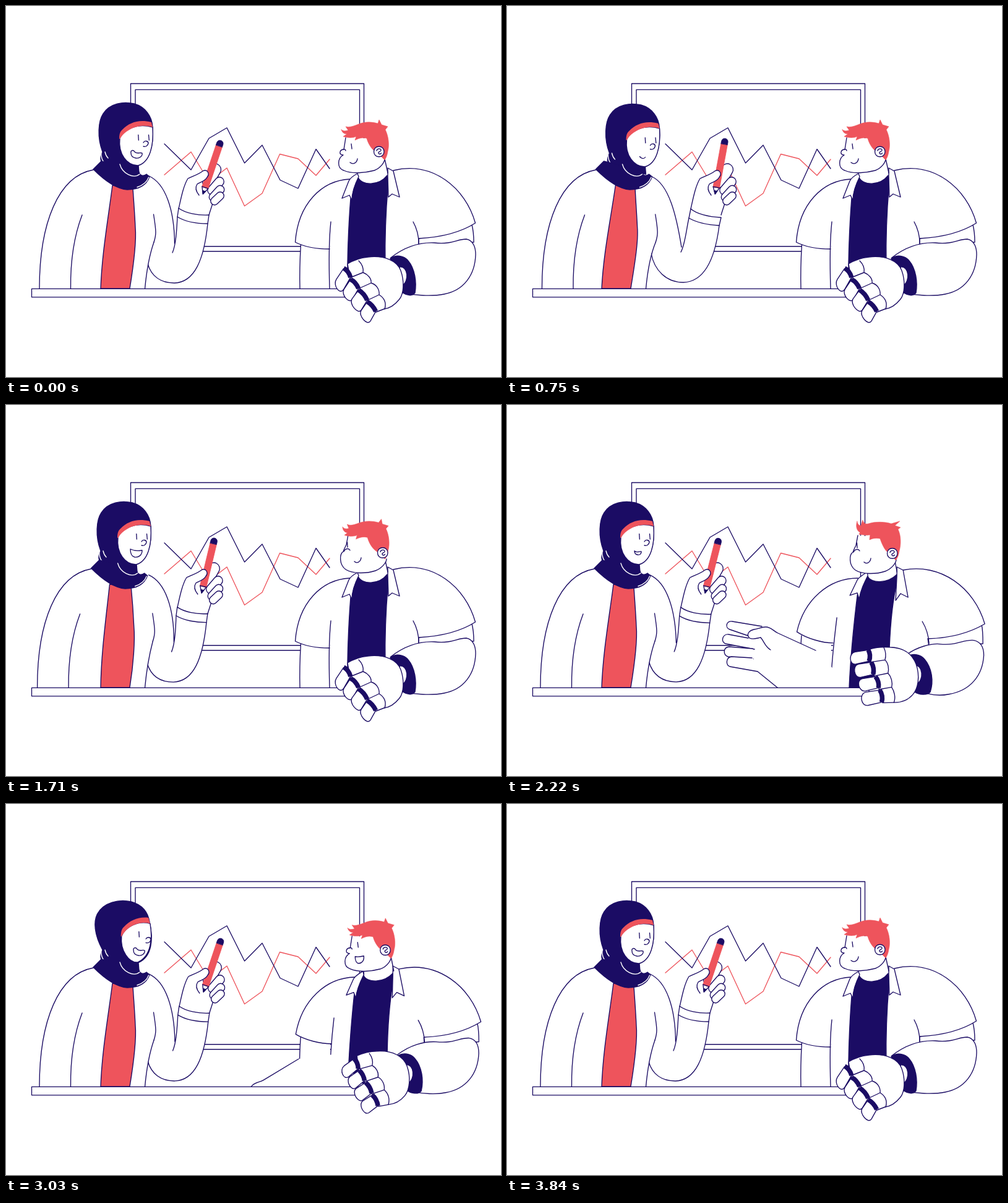
Animation of 800x600 px, one loop 3.87 s. Source, as an HTML page with a canvas:

```html
<!DOCTYPE html>
<html lang="en">
<head>
<meta charset="utf-8">
<title>Whiteboard talk</title>
<style>
html, body { margin: 0; width: 100%; height: 100%; overflow: hidden; background: #fff; }
canvas { display: block; width: 800px; height: 600px; }
</style>
</head>
<body>
<canvas id="stage" width="800" height="600"></canvas>
<script>
const LOOP = 3870;
const NAVY = '#1b0c64', RED = '#ee545c', WHITE = '#fff';
const c = document.getElementById('stage').getContext('2d');

// Blend the numbers of two paths of equal structure.
function mix(a, b, k) {
  const to = b.match(/-?[\d.]+/g);
  let i = 0;
  return a.replace(/-?[\d.]+/g, n => (+n + (to[i++] - n) * k).toFixed(2));
}

// Eased value from a flat list of time, value pairs.
function track(keys, t) {
  if (t <= keys[0]) return keys[1];
  for (let i = 2; i < keys.length; i += 2) {
    if (t < keys[i]) {
      const p = (t - keys[i - 2]) / (keys[i] - keys[i - 2]);
      return keys[i - 1] + (keys[i + 1] - keys[i - 1]) * p * p * (3 - 2 * p);
    }
  }
  return keys[keys.length - 1];
}

// Last value whose start time has passed.
function held(steps, t) {
  let v = steps[1];
  for (let i = 0; i < steps.length; i += 2) if (t >= steps[i]) v = steps[i + 1];
  return v;
}

function draw(d, fill, stroke = NAVY, width = 1.35) {
  const p = new Path2D(d);
  if (fill) { c.fillStyle = fill; c.fill(p); }
  if (stroke) { c.strokeStyle = stroke; c.lineWidth = width; c.stroke(p); }
}

function moved(x, y, fn) {
  c.save();
  c.translate(x, y);
  fn();
  c.restore();
}

function capsule(x1, y1, x2, y2, w) {
  const d = `M${x1},${y1} L${x2},${y2}`;
  draw(d, null, NAVY, w + 1.3);
  draw(d, null, WHITE, w - 1.4);
}

function board() {
  draw('M201.5,125.5 H578.5 V396.7 H201.5Z M209,135.3 H571.5 V388.7 H209Z');
  draw('M256,273 L299,236 L328,284 L357,262 L385.5,323.5 L414,303 L442.5,239.5 L472,247 L501,274 L523,248', null, RED);
  draw('M256,223 L299,265 L328,214 L357,197 L385.5,254 L414,225 L443,281.5 L472,295 L501,231.5 L523,263');
}

const LIPS = {
  smile: 'M205,239 C208,243 212,243 214,240',
  small: 'M206,236 C209,240 214,236 217,237 C217,242 213,243 210,242 C207,241 206,239 206,236Z',
  grin: 'M202,238 C201,233 206,232 208,236 C212,240 217,236 220,238 C221,243 215,247 210,246 C204,245 202,242 202,238Z',
  open: 'M204,233 C210,236 217,236 223,235 C223,243 217,247 211,246 C206,245 204,240 204,233Z'
};
const TALK = [0, 'grin', 180, 'small', 300, 'open', 450, 'small', 570, 'smile', 900, 'small',
  1020, 'grin', 1170, 'open', 1350, 'small', 1500, 'open', 1830, 'small', 2340, 'grin'];

function womanHead(t) {
  const x = track([0, 0, 330, -3, 750, 9.5, 1150, -3, 1710, -3, 2100, 0], t);
  const turn = track([2750, 0, 3200, 1, 3450, 1, 3780, 0], t);
  const nod = Math.max(0, x) / 9.5;
  moved(x, 2 * nod, () => {
    draw(mix(
      'M156,236 C147,212 149,186 157,174 C168,157 190,154 207,158 C225,163 236,178 237,196 C239,225 232,252 214,258 L215,270 L162,262 C152,254 151,245 156,236Z',
      'M156,236 C140,210 138,192 143,180 C152,160 180,153 200,158 C218,163 227,174 230,190 C238,215 238,245 214,256 L215,270 L162,262 C152,254 151,245 156,236Z', turn), NAVY);
    const face = mix(
      'M184,214 C190,199 212,189 237,196 C239,225 233,253 213,258 C196,258 181,240 184,214Z',
      'M188,214 C193,200 213,187 231,192 C236,212 236,243 213,255 C200,257 186,236 188,214Z', turn);
    draw(face, WHITE);
    c.save();
    c.clip(new Path2D(face));
    c.translate(1.5 * turn, 2.5 * nod - 3 * turn);
    draw('M213.8,208.5 L214.3,217');
    c.translate(4.5 * turn, -turn);
    draw('M230.5,208.5 L231.3,217 M222,221 C224,217 230,218 230,222 C229,227 225,228 222,227');
    c.translate(0, 2.5 * turn);
    draw(LIPS[held(TALK, t)], WHITE);
    c.restore();
    draw(mix(
      'M183,215 C183,204 186,202 188,200 C200,188 215,183 235,188 L237,196 C215,189 193,200 184,215Z',
      'M187,214 C187,204 189,201 191,199 C202,187 214,182 228,182 L231,192 C214,188 196,198 188,214Z', turn), RED, null);
    draw('M154,236 C153,247 158,255 166,260 M160,236 C161,241 163,244 165,246', null, WHITE);
  });
}

function womanArm(k) {
  const upper = mix('M231,275 C258,287 272,330 272.5,384', 'M234,276 C262,288 274,340 282,390', k);
  const outer = mix('L326,352 C320,410 305,447 272,448 C250,448 235,437 229,417',
    'L343,355 C336,410 318,446 285,447 C258,447 238,428 233,400', k);
  draw(upper + mix('L277,341', 'L294,343', k) + outer + 'L200,400 L205,296Z', WHITE, null);
  draw(upper + mix('M277,341 C276,360 275,385 269,399', 'M294,343 C290,360 288,385 281,398', k));
  draw(outer.replace('L', 'M'));
}

function womanHand(t, k) {
  moved(18 * k, 0, () => {
    draw('M279,328 C283,310 287,290 294,279 C300,276 310,273 318,267 L340,260 L345,300 L334,318 C332,325 330,332 328,338Z', WHITE, null);
    draw('M279,328 C283,310 287,290 294,279 C300,276 310,273 318,267 M328,338 C330,331 332,326 334,319');
    capsule(338, 264.5, 327, 284, 19);
    capsule(345, 284, 333, 298, 14.5);
    capsule(346, 297, 335, 309, 13.5);
    capsule(346, 307, 337, 315.5, 12.5);
    c.save();
    c.translate(318.3, 304);
    c.rotate(track([0, 18.6, 330, 14, 750, 10.4, 1150, 18, 1710, 13.4, 2220, 14.2, 2700, 18.6], t) * Math.PI / 180);
    draw('M-5.2,-11 L0,0 L5.2,-11Z', WHITE);
    draw('M-2.4,-5 L0,0 L2.4,-5Z', NAVY);
    draw('M-5.3,-11 V-82 H5.3 V-11Z', RED, RED, .8);
    draw('M-5.3,-11 H5.3');
    draw('M-5.3,-82 V-86 C-5,-93 5,-93 5.3,-86 V-82Z', NAVY, NAVY, .8);
    c.restore();
    draw('M318,267 C325,263 330,271 325,277 C322,283 314,285 309,288 C305,294 308,301 312,306', WHITE);
  });
  draw(mix('M279,327 C290,335 310,339 328,338 L326,352 C310,352 290,349 277,341Z',
    'M297,328 C306,336 325,341 346,342 L343,355 C325,354 308,351 294,343Z', k), WHITE);
}

function woman(t) {
  const sway = track([0, 0, 330, -3.5, 750, 2.5, 1150, -3.5, 1710, -3.4, 2100, 0], t);
  const k = track([0, 0, 330, -.15, 750, 1, 1150, -.1, 1710, -.12, 2220, .1, 2700, .17, 3200, 0], t);
  womanArm(k);
  draw(`M${141 + sway},265 C${85 + sway},275 ${54 + sway},350 ${54 + sway},457 L225,457 C226,430 232,400 240,378 L${231 + sway},275Z`, WHITE, null);
  moved(sway, 0, () => draw('M141,265 C85,275 54,350 54,457 M123,338 C110,372 104,415 104.5,457'));
  draw(mix('M172,290 C165,345 155,400 153,457 H200 C206,420 211,380 209,358 C208,335 206,310 205,294Z',
    'M176,290 C168,345 156,400 153,457 H200 C206,420 213,380 211,358 C210,335 208,310 207.5,294Z', sway / 3), RED);
  moved(sway * .5, 0, () => draw('M238.5,337 C243,365 243,370 239,382'));
  draw(`M${239 + sway * .5},382 C232,402 227,430 224.5,457`);
  womanHand(t, k);
  womanHead(t);
  moved(sway, 0, () => {
    draw('M154,251 L141,264 C160,283 178,296 196,297 C214,297 227,290 232,276 L227,272 C222,276 216,275 214,266Z', NAVY);
    draw('M184,256 C188,271 206,280 216,272 M230.5,277 C228,284 221,290 212,293', null, WHITE);
  });
}

function manHead(t, x) {
  const turn = track([1150, 0, 1550, 1, 2260, 1, 2500, 0], t);
  const hair = track([1150, 0, 1710, .2, 2200, 1, 2500, 0], t);
  const talk = held([0, 0, 2380, 1, 2560, 0, 2640, 1, 2850, 0, 2970, 1, 3120, 0], t);
  moved(x, x / 14, () => {
    const face = mix(
      'M549,213 L546,232 C539,232 537,241 545,241 C536,246 534,262 546,266 C560,272 580,270 595,266 C606,262 612,252 612,247',
      'M553,210 L550,226 C548,230 546,234 545,237 C539,241 538,258 549,266 C560,273 582,273 597,268 C608,264 615,254 615,249', turn);
    draw(face + 'L612,215Z', WHITE, null);
    draw(face);
    draw(mix('M558,223 L559,231 M545,232 C546,231 549,232 549,234',
      'M551.5,222 L552,230 M546,237 C548,232 554,231 556,235', turn));
    if (talk) draw('M554,246 C558,247 564,246 568,245 C569,252 565,257 560,257 C556,257 554,252 554,246Z', WHITE);
    else draw(mix('M556,253 C561,257 567,254 568,247', 'M563,253 C567,257 573,254 574,247', turn));
    draw(mix(
      'M542,200 C546,203 549,202 553,201 L549,195 C555,197 562,194 570,191 C580,187 590,187 601,190 L603,184 L607,192 L617,195 L613,200 C618,210 620,225 617,235 C616,242 614,246 612,249 L606,243 L595,234 C590,230 585,222 583,214 C576,212 570,214 564,217 L566,211 C560,214 551,213 545,211 L551,207 C546,207 543,204 542,200Z',
      'M552,187 C553,192 555,194 558,194 L561,185 C563,191 566,192 570,191 C582,187 598,188 607,191 L621,187 L613,194 L622,197 L618,200 C623,210 623,225 620,235 C619,242 617,247 614,250 L609,243 L600,236 C596,232 592,224 589,215 C584,214 578,214 572,217 L573,209 C566,210 562,209 555,208 L557,205 C552,203 549,196 552,187Z', hair), RED, RED, .6);
    moved(6 * turn, 3.5 * turn, () => {
      draw('M594.5,235.5 C594.5,224.5 611,224.5 611,235.5 C611,246.5 594.5,246.5 594.5,235.5Z', WHITE);
      draw('M599,234 C600,229.5 607,230.5 606,233.5 C605,236 601,235.5 602,238 C603,240 605,240 606.5,238');
    });
  });
}

function raisedArm(rise, dip) {
  if (rise < .01) return;
  c.save();
  c.beginPath();
  c.rect(0, 0, 800, 457);
  c.clip();
  c.translate(500, 430);
  c.rotate(-(1 - rise) * 80 * Math.PI / 180);
  c.translate(-500 - dip, -430 + 12 * dip);
  const end = `499,${397 - 8 * dip}`;
  draw(`M${end} L436,368 L412,360 L390,372 L385,385 L395,409 L405,431 L437,457 L520,530 L540,440Z`, WHITE, null);
  draw('M392,374 L360,363 C352,360 354,349 364,350 L412,358', WHITE);
  draw('M390,377 L358,371 C348,370 345,383 353,386 L400,395', WHITE);
  draw('M397,394 L359,391 C349,392 349,404 357,407 L398,411', WHITE);
  draw('M396,409 L363,407 C354,408 353,420 360,423 L405,431 L437,457 L470,484', WHITE);
  draw(`M426,396 C417,391 416,383 410,376 C404,377 398,380 392,377 C386,371 391,365 399,363 C406,362 411,359 418,359 C427,359 431,366 438,369 L${end}`, WHITE);
  c.restore();
}

function man(t, grip) {
  const body = track([1710, 0, 2180, 1, 2380, 1.1, 2700, .8, 3420, .42, 3840, 0], t);
  const tilt = track([2220, 0, 2700, 1, 3150, 0], t);
  const x = track([1710, 0, 2200, 14, 2700, 12, 3420, 8, 3840, 0], t);
  const pose = (a, b) => mix(a, b, body);

  draw(`M${568 + x},262 L${612 + x},245 L${617 + x},270 L${617 + x},292 L${570 + x},292Z`, WHITE, null);
  draw(pose('M556,280 L523,393 L523,457 L640,457 L667,376 L626,266 L617,275 L569,277Z',
    'M567,280 L527,385 L523,457 L650,457 L680,378 L640,267 L630,275 L583,277Z'), WHITE, null);
  const arm = pose('M476.5,385 C475,410 474.5,440 475,457', 'M476,373 C474,395 474,440 474,457');
  draw(arm + 'L523,457 L524,388Z', WHITE, null);
  draw(arm);
  draw(pose('M569,277 C575,291 603,291 616,274 L617.5,290 C614,330 612,370 613,420 L613,457 L552,457 C551,400 555,330 558,300Z',
    'M583,277 C588,289 615,289 630,274 L630,288 C624,312 620,345 618,393 L618,457 L553,457 C555,410 562,340 567,300Z'), NAVY);
  draw(mix(pose('M556,280 C510,282 472,320 467.5,382 C483,390 505,393 523,393',
    'M567,280 C520,280 480,315 468.5,367 C485,378 510,385 527,385'),
    'M567,280 C520,282 482,320 469,372 C485,381 510,387 526,387', tilt), WHITE);
  draw(pose('M525,349 C521,385 522,425 523,457', 'M533,344 C528,385 524,425 523,457'));
  raisedArm(track([1720, 0, 2180, 1, 2750, 1, 3200, 0], t), tilt);

  draw(pose('M667,376 L753,354 C755,362 756,370 756,382 L667,392Z', 'M680,378 L767,356 C769,364 769,372 769,386 L682,394Z'), WHITE);
  draw(mix('M622,407 C645,389 668,382 692,383 C722,386 728,377 744,377 C756,379 759,392 759,402 C758,435 740,460 708,466 C688,470 660,468 641,464',
    'M648,404 C665,391 688,386 700,387 C730,390 738,379 756,381 C769,384 772,395 772,405 C770,438 750,462 715,468 C705,470 695,470 684,467', grip), WHITE);
  draw(mix(pose('M626,266 C690,250 743,295 758.5,351 C735,366 705,374 667,376',
    'M640,267 C700,255 755,295 772,354 C745,370 715,377 680,378'),
    'M638,268 C700,252 752,292 770,349 C745,366 715,375 680,376', tilt), WHITE);
  draw(pose('M658,349 C663,358 667,368 667,384', 'M671,350 C677,360 681,370 682,386'));

  draw(pose('M568,271 C562,274 556,279 554,283 L543,311 L555,306 L559,314 C559,300 564,288 570,276Z',
    'M582,270 C576,274 568,279 566,283 L554,308 L566,304 L569,314 C571,300 577,288 583,276Z'), WHITE);
  draw(pose('M617,262 L626,267 L636,309 L624,304 L618,309 L617,276Z',
    'M630,262 L640,267 L648,311 L636,305 L628,316 L630,276Z'), WHITE);
  draw(`M${612 + x},247 L${617 + x * .95},270`);
  manHead(t, x);
}

// Each finger: both ends of its band, then the reach to the tip.
const FINGERS = [
  ['545,424 557,440 -16,26', '588,392 588,412 -31,3'],
  ['556,442 570,458 -14,23', '592,412 594,434 -30,3'],
  ['569,459 584,477 -14,21', '598,436 602,456 -31,4'],
  ['583,478 598,495 -13,21', '604,458 606,480 -33,4']
];

function robotHand(k) {
  draw(mix('M621,408 C630,402 643,403 650,412 C661,425 664,447 661,464 C657,470 647,468 640,463Z',
    'M653,405 C660,402 671,403 678,411 C690,425 693,447 687,464 C682,470 668,469 661,464Z', k), NAVY);
  moved(25 * k, -k, () => draw('M636,422 C650,420 652,446 640,452Z', WHITE));
  draw(mix('M552,417 C565,409 575,407 585,406 C612,403 632,412 638,428 C644,445 643,465 636,474 C628,484 620,489 611,490 L598,495 L584,476 L568,458 L556,440Z',
    'M591,392 C603,389 613,389 623,390 C648,391 658,403 664,418 C671,438 667,458 658,468 C650,477 640,480 629,480 L608,480 L604,458 L597,436 L591,413Z', k), WHITE);
  draw(mix('M570,412 C576,418 578,425 577,431 L557,439 M577,431 C585,434 591,441 590,448 L570,457 M590,448 C598,450 604,458 603,467 L584,476 M603,467 C611,472 615,480 612,490',
    'M614,390 C617,397 617,404 615,410 L591,413 M615,410 C620,415 621,425 619,432 L596,436 M619,432 C624,438 626,448 624,455 L603,458 M624,455 C628,462 630,472 627,480', k));
  c.lineCap = 'butt';
  FINGERS.forEach(([a, b]) => {
    const [x1, y1, x2, y2, dx, dy] = mix(a, b, k).split(/[ ,]/).map(Number);
    // Point at u across the finger and v along it.
    const at = (u, v) => `${x1 + (x2 - x1) * u + dx * v},${y1 + (y2 - y1) * u + dy * v} `;
    draw(`M${at(.04, 0)}L${at(0, .7)}C${at(0, 1.08)}${at(1, 1.08)}${at(1, .7)}L${at(.96, 0)}Z`, WHITE);
    draw(`M${at(.04, -.02)}Q${at(.5, -.16)}${at(.96, -.02)}`, null, NAVY, 7.5);
  });
  c.lineCap = 'round';
}

function render(t) {
  const grip = track([1880, 0, 2310, 1, 2750, 1, 3240, 0], t);
  c.fillStyle = WHITE;
  c.fillRect(0, 0, 800, 600);
  c.lineCap = c.lineJoin = 'round';
  board();
  woman(t);
  man(t, grip);
  draw('M41.5,457.3 H585 V470.8 H41.5Z', WHITE);
  robotHand(grip);
}

const start = performance.now();
function tick() {
  render((performance.now() - start) % LOOP);
  requestAnimationFrame(tick);
}
tick();
</script>
</body>
</html>
```
